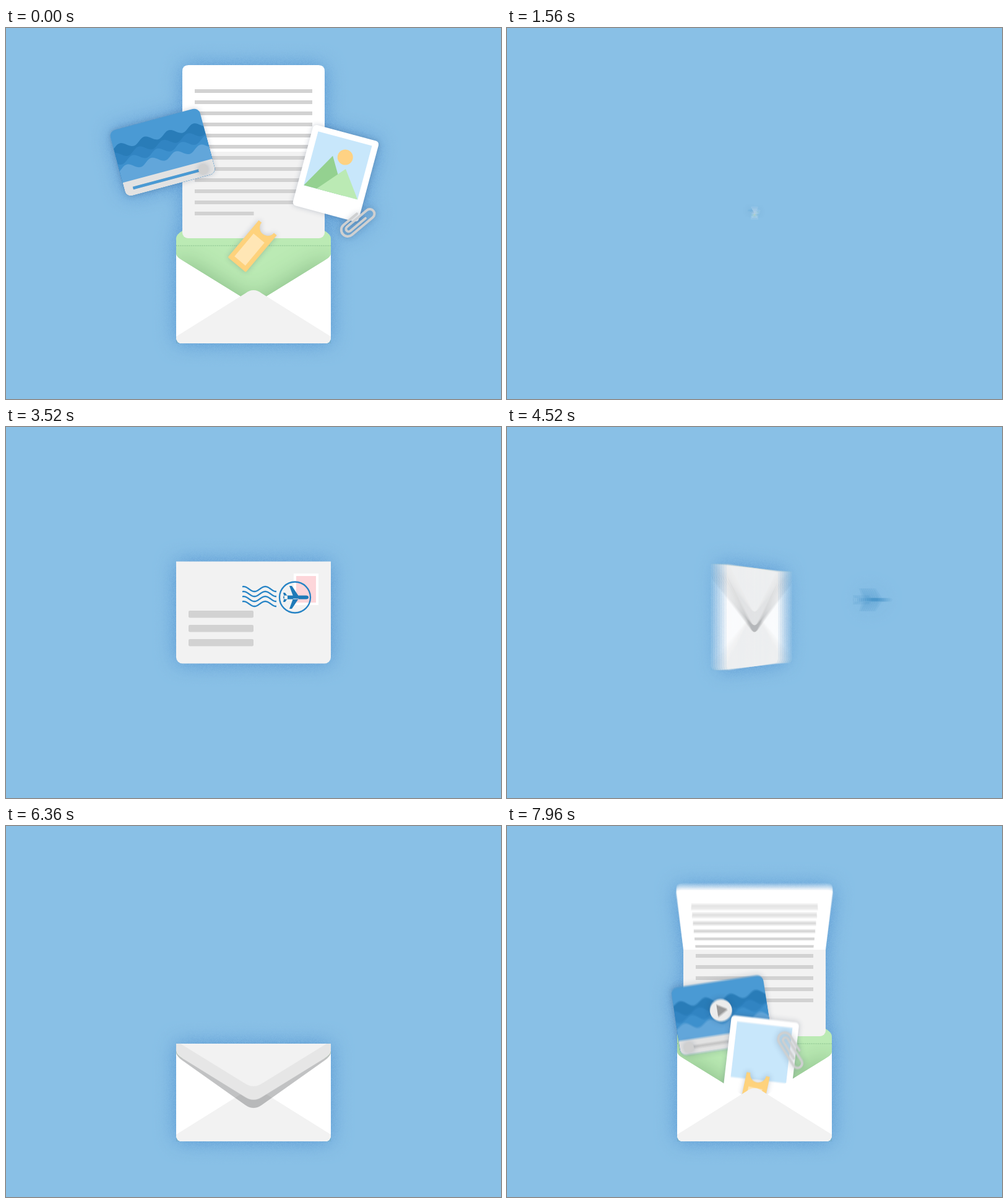
Write an HTML page with a canvas that moves like this. It is 800x600 px and loops after 8000 ms.

```html
<!DOCTYPE html>
<html lang="en">
<head>
<meta charset="utf-8">
<title>Letter</title>
<style>
html, body { margin: 0; width: 100%; height: 100%; overflow: hidden; background: #89c0e6; }
canvas { display: block; }
</style>
</head>
<body>
<canvas id="stage" width="800" height="600"></canvas>
<script>
const W = 800, H = 600, LOOP = 8000, SAMPLES = 8, SHUTTER = 20;
const stage = document.getElementById('stage').getContext('2d');

function layer(w = W, h = H) {
  const c = document.createElement('canvas');
  c.width = w;
  c.height = h;
  return c.getContext('2d');
}
const work = layer(), base = layer(), shade = layer(), face = layer();

const prog = (t, a, b) => Math.min(1, Math.max(0, (t - a) / (b - a)));
const lerp = (a, b, p) => a + (b - a) * p;
const outCubic = p => 1 - (1 - p) ** 3;
const inOut = (p, k) => p < .5 ? (2 * p) ** k / 2 : 1 - (2 - 2 * p) ** k / 2;

// Seeded grain that eats into the soft shadow
const grain = (() => {
  const g = layer(256, 256), img = g.createImageData(256, 256);
  let seed = 7;
  for (let i = 3; i < img.data.length; i += 4) {
    seed = (seed * 1664525 + 1013904223) >>> 0;
    img.data[i] = (seed >>> 24) * .45;
  }
  g.putImageData(img, 0, 0);
  return shade.createPattern(g.canvas, 'repeat');
})();

const flapPath = new Path2D('M-125 0V12Q-125 18-115 24L-13 88Q0 96 13 88L115 24Q125 18 125 12V0Z');
const pocketPath = new Path2D('M-125 14Q-125 18-115 24L0 95L115 24Q125 18 125 14V148Q125 158 115 158H-115Q-125 158-125 148Z');
const bottomPath = new Path2D('M-125 147L-13 77Q0 67 13 77L125 147V148Q125 158 115 158H-115Q-125 158-125 148Z');
const planePath = new Path2D('M-19-3H17Q21-3 21 0Q21 3 17 3H-19L-20 0ZM-4-2L-10-18.5H-6L5-2ZM-4 2L-10 18.5H-6L5 2ZM-13-2L-17-7.5H-20L-18 0L-20 7.5H-17L-13 2Z');
const clipPath = new Path2D('M8-11H-20A10.5 10.5 0 0 0-20 10H24A7.5 7.5 0 0 0 24-5H-18A4 4 0 0 0-18 3.5H14');
const ticketPath = new Path2D('M-19-39H-13A13 13 0 0 0 13-39H19V37Q19 39 17 39H-17Q-19 39-19 37Z');

function fill(g, color, path) {
  g.fillStyle = color;
  g.fill(path);
}
function box(g, color, x, y, w, h, r = 0) {
  g.fillStyle = color;
  g.beginPath();
  g.roundRect(x, y, w, h, r);
  g.fill();
}
function disc(g, color, x, y, r) {
  g.fillStyle = color;
  g.beginPath();
  g.arc(x, y, r, 0, 7);
  g.fill();
}
function poly(g, color, pts) {
  g.fillStyle = color;
  g.beginPath();
  pts.forEach(p => g.lineTo(...p));
  g.fill();
}
function lift(g, draw) {
  g.shadowColor = 'rgba(40,60,90,.25)';
  g.shadowBlur = 8;
  draw();
  g.shadowColor = 'transparent';
}

function card(g, t, done) {
  const p = done ? prog(t, 40, 840) : 0, shift = 41 * outCubic(p);
  lift(g, () => box(g, '#4a9ad4', -75, -55, 150, 110, 10));
  g.save();
  g.beginPath();
  g.roundRect(-75, -55, 150, 110, 10);
  g.clip();
  [[-27, '#297cb8'], [-14, '#3184c2'], [-3, '#3d90cd'], [9, '#62a6da']].forEach(([y, color], i) => {
    const pts = [[75, 55], [-75, 55]];
    for (let x = -75; x <= 75; x += 2)
      pts.push([x, y - 5 * Math.cos((x - 19 + shift + i * 13) * 2 * Math.PI / 41)]);
    poly(g, color, pts);
  });
  box(g, '#e2e2e2', -75, 31, 150, 24);
  g.restore();
  const knob = done ? 56.5 + 3 * p : -60;
  box(g, '#c4c4c4', -61, 41.5, 121, 4.5);
  box(g, '#4a9ad4', -61, 41.5, knob + 61, 4.5);
  lift(g, () => disc(g, '#d0d0d0', knob, 43.7, 8));
  if (!done) {
    lift(g, () => disc(g, '#ececec', 0, -8, 18));
    poly(g, '#999', [[-6, -18], [11, -8], [-6, 2]]);
  }
}

function photo(g, t, done) {
  lift(g, () => box(g, '#fff', -55, -67.5, 110, 135, 6));
  box(g, '#c8e7fb', -45, -58, 90, 90);
  if (!done) return;
  const grow = 1 + .06 * Math.sin(Math.PI * prog(t, 40, 840));
  const peak = (color, l, x, h, r) => poly(g, color, [[l, 32], [x, 32 - h * grow], [r, 32]]);
  disc(g, '#ffd283', 8, 32 - 61 * grow, 12.5);
  peak('#94d190', -45, -12, 58, 22);
  peak('#bbeab4', -23.5, 13.6, 43, 45);
}

function clip(g) {
  g.strokeStyle = '#cfd0d1';
  g.lineWidth = 4;
  g.lineCap = 'round';
  lift(g, () => g.stroke(clipPath));
}

function ticket(g) {
  lift(g, () => fill(g, '#fed27c', ticketPath));
  box(g, '#ffe6b5', -11.5, -17, 23, 48);
}

// Each item: drawing, start time, then hidden, emerging and resting [x, y, degrees]
const items = [
  [card, 7620, [400, 490, 0], [347, 306, -8.6], [253, 201, -15]],
  [photo, 7680, [405, 505, 0], [410, 379, 6.6], [533, 235, 15]],
  [clip, 7680, [420, 475, 80], [459, 362, 58], [568, 314, -40]],
  [ticket, 7780, [398, 490, 0], [398, 440, 12], [398, 353, 40]]
];

function drawItems(g, t, done) {
  for (const [draw, start, hidden, half, rest] of items) {
    if (!done && t < start) continue;
    const p = (t - start) / (7960 - start), q = p * (1.6 - .6 * p);
    const [x, y, turn] = done ? rest : hidden.map((v, i) => lerp(v, half[i], q));
    g.save();
    g.translate(x, y);
    g.rotate(turn * Math.PI / 180);
    draw(g, t, done);
    g.restore();
  }
}

// Sheet with its upper half turned by angle about the fold
function letter(g, fold, angle) {
  const c = Math.cos(angle), s = Math.sin(angle);
  const at = (u, v) => {
    const k = 1 / (1 - v * s / 1050);
    return [400 + u * k, fold - v * c * k];
  };
  box(g, '#f2f2f2', 285, fold, 230, 140, [0, 0, 9, 9]);
  if (c > 0) {
    for (let i = 0; i < 5; i++) box(g, '#d2d2d2', 305, fold + 7 + 18 * i, 190, 6);
    box(g, '#d2d2d2', 305, fold + 97, 95.5, 6);
  }
  g.fillStyle = '#fff';
  g.beginPath();
  g.moveTo(...at(-115, 0));
  g.lineTo(...at(-115, 130));
  g.quadraticCurveTo(...at(-115, 140), ...at(-105, 140));
  g.lineTo(...at(105, 140));
  g.quadraticCurveTo(...at(115, 140), ...at(115, 130));
  g.lineTo(...at(115, 0));
  g.fill();
  if (c > 0)
    for (let v = 8; v < 100; v += 18)
      poly(g, '#d2d2d2', [at(-95, v - 3), at(-95, v + 3), at(95, v + 3), at(95, v - 3)]);
}

function back(g, t) {
  const done = t < 1560;
  const drop = done ? 1 : prog(t, 5440, 6040);
  const raise = .6 * Math.sin(Math.PI * drop);
  const turn = done ? Math.PI : raise + Math.PI * inOut(prog(t, 6280, 6780), 2);
  const c = Math.cos(turn);
  g.save();
  g.translate(400, 352 - 123.5 * (1 - inOut(drop, 3)));
  box(g, '#bbeab4', -125, 0, 250, 120);
  if (c < 0) {
    g.save();
    g.scale(1, c);
    fill(g, '#bbeab4', flapPath);
    g.restore();
    g.strokeStyle = '#93c996';
    g.lineWidth = 1.5;
    g.setLineDash([1.5, 1.5]);
    g.beginPath();
    g.moveTo(-125, 0);
    g.lineTo(125, 0);
    g.stroke();
    g.setLineDash([]);
  }
  g.save();
  g.beginPath();
  g.rect(-125, 0, 250, 158);
  g.clip();
  g.shadowColor = 'rgba(50,110,60,.4)';
  g.shadowBlur = 40;
  fill(g, '#fff', pocketPath);
  g.restore();
  if (done || t > 6280) {
    g.save();
    g.translate(-400, -352);
    letter(g, done ? 200 : lerp(358, 200, inOut(prog(t, 6840, 7640), 2)),
      done ? 0 : Math.PI * (1 - inOut(prog(t, 7480, 8240), 2)));
    drawItems(g, t, done);
    g.restore();
  }
  fill(g, '#fff', pocketPath);
  fill(g, '#f2f2f2', bottomPath);
  if (c > 0) {
    g.save();
    g.scale(1, Math.min(1.12 + .06 * Math.sin(turn), c * 1.5));
    fill(g, 'rgba(50,54,58,.3)', flapPath);
    g.restore();
    g.scale(1, c);
    fill(g, '#e6e6e6', flapPath);
    g.clip(flapPath);
    g.translate(0, -22);
    fill(g, '#f2f2f2', flapPath);
  }
  g.restore();
}

function front(g, dy) {
  g.save();
  g.translate(400, 304 + dy);
  box(g, '#f2f2f2', -125, -82.5, 250, 165, [0, 0, 10, 10]);
  for (const y of [-3, 20, 43]) box(g, '#d2d2d2', -105, y, 105, 11.5, 2);
  box(g, '#fff', 65, -63, 40, 51);
  box(g, '#fdd6da', 69, -59, 32, 43);
  g.strokeStyle = '#2583c5';
  g.lineWidth = 2.3;
  g.beginPath();
  for (let y = -38; y < -10; y += 8)
    for (let x = -18; x <= 37; x++)
      g[x > -18 ? 'lineTo' : 'moveTo'](x, y - 4 * Math.cos((x + 16) * 2 * Math.PI / 35));
  g.stroke();
  g.beginPath();
  g.arc(67, -24.5, 25, 0, 7);
  g.stroke();
  g.restore();
}

function plane(g, t, dy) {
  const q = Math.max(0, t - 4240) / 280;
  g.save();
  g.translate(468 + 122 * q ** 3, 279.5 + dy);
  g.globalAlpha = 1 - prog(t, 4400, 4650);
  fill(g, '#1f7ab8', planePath);
  g.restore();
}

// Turn the face layer about its vertical axis, column by column
function spin(g, angle) {
  const c = Math.cos(angle), s = Math.sin(angle) / 1335, cy = 307.5;
  const depth = x => 1 / (1 + x * s);
  for (let x = -126; x < 126; x++) {
    const k = depth(x), a = x * c * k, b = (x + 1) * c * depth(x + 1);
    g.drawImage(face.canvas, 400 + x, 200, 1, 200, 400 + a, cy + (200 - cy) * k, b - a + .5, 200 * k);
  }
}

function flip(p) {
  return p < .318 ? .64 * (p / .318) ** 1.75 : 1 - .36 * Math.exp(-9.7 * (p - .318));
}

function scene(g, t) {
  if (t < 1560) {
    const p = prog(t, 840, 1560), k = 1 - p * p * (1.9 * p - .9);
    g.save();
    g.translate(400, 300);
    g.scale(k, k);
    g.translate(-400, -300);
    back(g, t);
    g.restore();
  } else if (t > 3120 && t < 4240) {
    const dy = t < 3520
      ? lerp(390, -4, outCubic(prog(t, 3120, 3520)))
      : -4 * (1 - inOut(prog(t, 3520, 3720), 2));
    front(g, dy);
    plane(g, t, dy);
  } else if (t >= 4240 && t < 5120) {
    const angle = Math.PI * (1 - flip(prog(t, 4240, 5120)));
    const isFront = angle > Math.PI / 2;
    face.clearRect(0, 0, W, H);
    if (isFront) front(face, 0);
    else back(face, t);
    spin(g, isFront ? angle - Math.PI : angle);
    plane(g, t, 0);
  } else if (t >= 5120) back(g, t);
}

function render(t) {
  work.clearRect(0, 0, W, H);
  scene(work, t);

  shade.globalCompositeOperation = 'source-over';
  shade.clearRect(0, 0, W, H);
  shade.shadowColor = 'rgba(74,138,203,.95)';
  shade.shadowBlur = 32;
  shade.shadowOffsetX = 2000;
  shade.drawImage(work.canvas, -2000, 0);
  shade.shadowColor = 'transparent';
  shade.globalCompositeOperation = 'destination-out';
  shade.fillStyle = grain;
  shade.fillRect(0, 0, W, H);

  base.fillStyle = '#89c0e6';
  base.fillRect(0, 0, W, H);
  base.drawImage(shade.canvas, 0, 0);

  // Motion blur: running average over the shutter time
  for (let i = 0; i < SAMPLES; i++) {
    const at = t + SHUTTER * ((i + .5) / SAMPLES - .5);
    work.drawImage(base.canvas, 0, 0);
    scene(work, Math.min(LOOP - 1, Math.max(0, at)));
    stage.globalAlpha = 1 / (i + 1);
    stage.drawImage(work.canvas, 0, 0);
  }
}

let start;
function frame(now) {
  start ??= now;
  render((now - start) % LOOP);
  requestAnimationFrame(frame);
}
requestAnimationFrame(frame);
</script>
</body>
</html>
```
